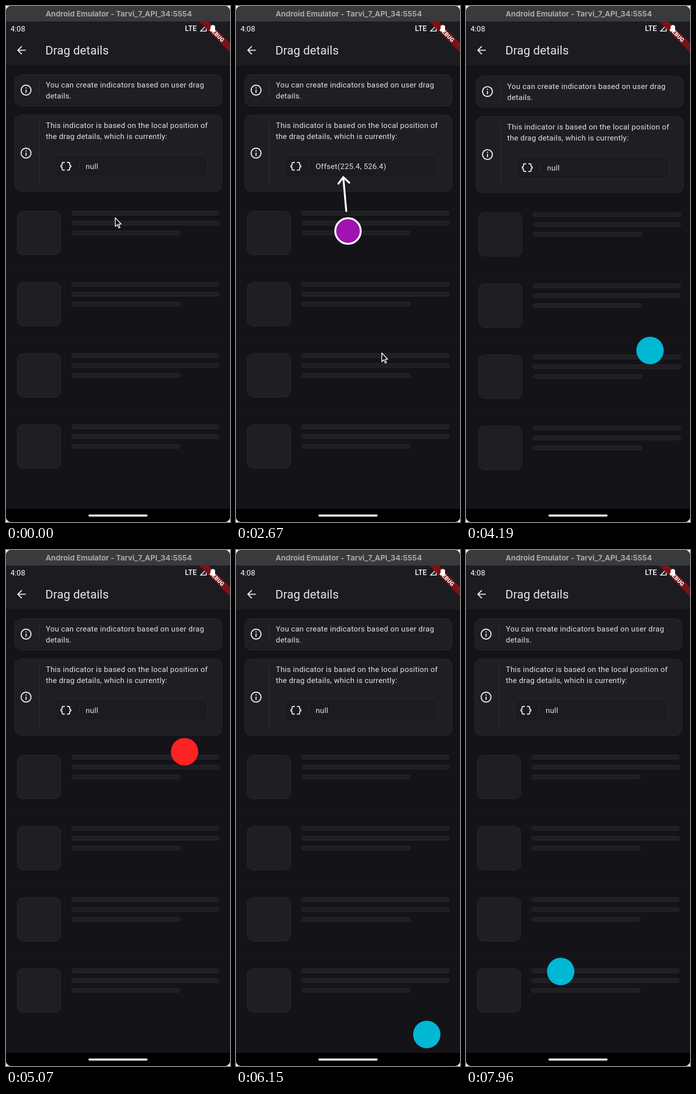
Write an HTML page that moves like this. It is 450 px wide and 1032 px high and loops after 8000 ms.

```html
<!DOCTYPE html>
<html lang="en">
<head>
<meta charset="utf-8">
<title>Drag details</title>
<style>
  html, body { margin: 0; width: 100%; height: 100%; overflow: hidden; background: #fff; }
  svg { display: block; width: 450px; height: 1032px; }
  text { font-family: Roboto, sans-serif; fill: #e6e1e5; white-space: pre; }
  .title { font: 700 15px Inter, sans-serif; fill: #a9a9ab; text-anchor: middle; }
  .status { font-size: 15.3px; fill: #fff; }
  .heading { font-size: 24.05px; }
  .body { font-size: 15.31px; letter-spacing: .273px; }
  .debug { font-size: 11.2px; font-weight: 900; fill: #fff; text-anchor: middle; }
  .box { fill: #1f1e23; stroke: #2b2a2f; }
  .inner { fill: #1c1b20; stroke: #2b2a2f; }
  .rule { stroke: #343338; }
  .split { stroke: #1c1b20; }
  .icon { fill: #e6e1e5; }
</style>
</head>
<body>
<svg viewBox="0 0 450 1032">
  <defs>
    <clipPath id="window"><rect width="450" height="1032" rx="10"/></clipPath>
    <clipPath id="area"><rect y="119" width="450" height="887"/></clipPath>
    <clipPath id="app"><rect y="31" width="450" height="975"/></clipPath>
    <g id="info">
      <circle r="9.85" fill="none" stroke="#e6e1e5" stroke-width="2.2"/>
      <path class="icon" d="M-1.1-5.5h2.2v2.2h-2.2zM-1.1-1.1h2.2v6.6h-2.2z"/>
    </g>
    <path id="brace" class="icon" d="M4 7v2c0 .55-.45 1-1 1H2v4h1c.55 0 1 .45 1 1v2c0 1.65 1.35 3 3 3h3v-2H7c-.55 0-1-.45-1-1v-2c0-1.3-.84-2.42-2-2.83v-.34C5.16 11.42 6 10.3 6 9V7c0-.55.45-1 1-1h3V4H7C5.35 4 4 5.35 4 7z"/>
    <g id="row">
      <rect class="box" x="22.5" y="410.5" width="87.5" height="87" rx="12"/>
      <rect class="box" x="131.5" y="410.5" width="297" height="8" rx="4"/>
      <rect class="box" x="131.5" y="430.2" width="297" height="8" rx="4"/>
      <rect class="box" x="131.5" y="449.9" width="219" height="8" rx="4"/>
    </g>
  </defs>
  <g clip-path="url(#window)">
    <rect width="450" height="1032" fill="#141318"/>
    <g clip-path="url(#area)">
      <g id="list">
        <rect class="box" x="17.5" y="137.5" width="416.5" height="62.5" rx="13"/>
        <use href="#info" x="40.3" y="168.3"/>
        <path class="rule" d="M66.8 151v35"/>
        <text class="body" x="80" y="163">You can create indicators based on user drag</text>
        <text class="body" x="80" y="185">details.</text>

        <rect class="box" x="17.5" y="218" width="416.5" height="152.5" rx="13"/>
        <use href="#info" x="40.3" y="294.3"/>
        <path class="rule" d="M66.8 232v124"/>
        <text class="body" x="80" y="244">This indicator is based on the local position of</text>
        <text class="body" x="80" y="266">the drag details, which is currently:</text>
        <rect class="inner" x="98" y="298" width="307" height="45" rx="12"/>
        <g transform="translate(120.3 320.5) scale(1.094)">
          <use href="#brace" x="-12" y="-12"/>
          <use href="#brace" x="-12" y="-12" transform="scale(-1 1)"/>
        </g>
        <path class="rule" d="M146.8 312v17"/>
        <text class="body" id="value" x="160" y="326">null</text>
      </g>
      <g id="ball">
        <g id="arrow" fill="none" stroke="#fff" stroke-width="3.8" stroke-linecap="round">
          <path d="M0-40V-108M-11-96L0-108L11-96"/>
        </g>
        <circle id="disc"/>
      </g>
    </g>

    <rect y="31" width="450" height="88" fill="#1c1b20"/>
    <rect width="450" height="31" fill="#3a393c"/>
    <text class="title" x="226.5" y="20.5">Android Emulator - Tarvi_7_API_34:5554</text>
    <text class="status" x="9" y="50.5">4:08</text>
    <text class="status" x="359.5" y="50" style="font-size:14.8px;font-weight:500">LTE</text>
    <path d="M391 50.3H402.3V39z" fill="none" stroke="#fff" stroke-width="1.6"/>
    <path class="icon" transform="translate(17.9 75.4) scale(1.094)" d="M20 11H7.83l5.59-5.59L12 4l-8 8 8 8 1.41-1.41L7.83 13H20v-2z"/>
    <text class="heading" x="79" y="96.5">Drag details</text>
    <g clip-path="url(#app)">
      <g transform="translate(450 31) rotate(45)">
        <rect x="-43.8" y="30.6" width="87.6" height="13.2" fill="#7a1316"/>
        <text class="debug" y="41.2">DEBUG</text>
      </g>
    </g>
    <path d="M413.5 38h4v1.5h2.5v11.7h-9V39.5h2.5z" fill="#fff"/>

    <rect y="1006" width="450" height="26" fill="#000"/>
    <rect x="165.500" y="1017" width="119" height="4.200" rx="2.100" fill="#e8e8e8"/>
    <path id="cursor" d="M.5.5V18L4.700 14.200L7.500 20.800L10 19.700L7.300 13.200H12.500Z" fill="#111" stroke="#fff" stroke-width="1.500" stroke-linejoin="round"/>
  </g>
</svg>
<script>
const LOOP = 8000, RELEASE = 3260, LAUNCH = 3343, LAG = 120, DP = 1.0938;
const AREA = { left: 27.5, top: 146.5, w: 395, h: 832 };
const HOME = { x: 225, y: 450 };
const START_Y = 423;

// time, x, y of the pointer
const POINTER = [
  [230, 219, 423], [1040, 214, 610], [1400, 190, 640], [1850, 133, 660],
  [2150, 93, 685], [2550, 246.2, 694.8], [2670, 292, 693.5], [2950, 386, 660]
];
// time, unfolded x and y of the flying ball
const FLIGHT = [
  [LAUNCH, -197.5, -303.5], [4190, 447, 541.5], [5070, 1120.5, 1406],
  [6150, 1935, 2485.5], [7260, 2777.5, 3595.5], [7960, 3322, 4294.5], [8000, 3352.4, 4334.5]
];
const COLORS = ['#a013b0', '#ff6d00', '#00c853', '#00b8d4', '#2962ff', '#ff2222', '#ffab00', '#a013b0',
  '#00b8d4', '#ff2222', '#00c853', '#ff6d00', '#2962ff', '#ff2a1b', '#a013b0', '#00b8d4'];

const el = id => document.getElementById(id);
const [list, value, ball, arrow, disc, cursor] =
  ['list', 'value', 'ball', 'arrow', 'disc', 'cursor'].map(el);
const set = (node, attrs) => { for (const k in attrs) node.setAttribute(k, attrs[k]); };
const move = (node, x, y) => node.setAttribute('transform', `translate(${x} ${y})`);
const show = (node, on) => { node.style.display = on ? '' : 'none'; };
const clamp = (v, lo, hi) => Math.min(hi, Math.max(lo, v));

function addRows() {
  const ns = 'http://www.w3.org/2000/svg';
  for (let i = 0; i < 4; i++) {
    const row = document.createElementNS(ns, 'use');
    set(row, { href: '#row', y: i * 142.3 });
    list.append(row);
    if (i === 3) break;
    const line = document.createElementNS(ns, 'path');
    set(line, { class: 'split', d: `M-5 ${529.5 + i * 142.3}H455` });
    list.append(line);
  }
}

function sample(path, t) {
  const last = path[path.length - 1];
  if (t <= path[0][0]) return path[0].slice(1);
  if (t >= last[0]) return last.slice(1);
  const i = path.findIndex(p => p[0] > t);
  const a = path[i - 1], b = path[i], f = (t - a[0]) / (b[0] - a[0]);
  return [a[1] + (b[1] - a[1]) * f, a[2] + (b[2] - a[2]) * f];
}

// Reflects an unfolded distance back between two walls.
function fold(d, size) {
  const m = ((d % (2 * size)) + 2 * size) % (2 * size);
  return m > size ? 2 * size - m : m;
}

function hitCount(t) {
  const [x, y] = sample(FLIGHT, t);
  return Math.floor(x / AREA.w) + Math.floor(y / AREA.h) + 2;
}

const hits = [];
for (let t = LAUNCH, n = 0; t < LOOP; t++) {
  const c = hitCount(t);
  if (c !== n) hits.push(t);
  n = c;
}

function shake(t) {
  const age = t - (hits.filter(h => h <= t).pop() ?? -LOOP);
  return age < 270 ? 2.8 * Math.sin(age / 270 * 2 * Math.PI) : 0;
}

function drawDrag(t) {
  const [x, y] = sample(POINTER, t - LAG);
  const pull = y - START_Y;
  const by = Math.min(HOME.y, 91.5 + 2.1 * pull);
  const grow = clamp((pull - 150) / 30, 0, 1);
  const angle = Math.atan2(HOME.x - x, y - by) * 180 / Math.PI;
  const active = pull > 0;
  value.textContent = active
    ? `Offset(${(x / DP).toFixed(1)}, ${((y - 119) / DP).toFixed(1)})` : 'null';
  show(ball, active);
  show(arrow, grow > 0);
  move(ball, HOME.x, by);
  arrow.setAttribute('transform', `rotate(${angle}) scale(${grow})`);
  set(disc, { r: 25.6, fill: COLORS[0], stroke: '#fff', 'stroke-width': 3.8 });
  move(list, 0, 0);
  move(cursor, ...sample(POINTER, t));
}

function drawFlight(t) {
  const [x, y] = sample(FLIGHT, t);
  const s = shake(t);
  value.textContent = 'null';
  show(ball, true);
  show(arrow, false);
  move(ball, AREA.left + fold(x, AREA.w), AREA.top + fold(y, AREA.h));
  set(disc, { r: 27.5, fill: COLORS[hitCount(t) % COLORS.length], stroke: 'none' });
  move(list, s, s);
}

function draw(now) {
  const t = now % LOOP;
  const dragging = t < RELEASE;
  show(cursor, dragging);
  (dragging ? drawDrag : drawFlight)(t);
}

function tick() {
  draw(performance.now());
  requestAnimationFrame(tick);
}

addRows();
tick();
</script>
</body>
</html>
```
